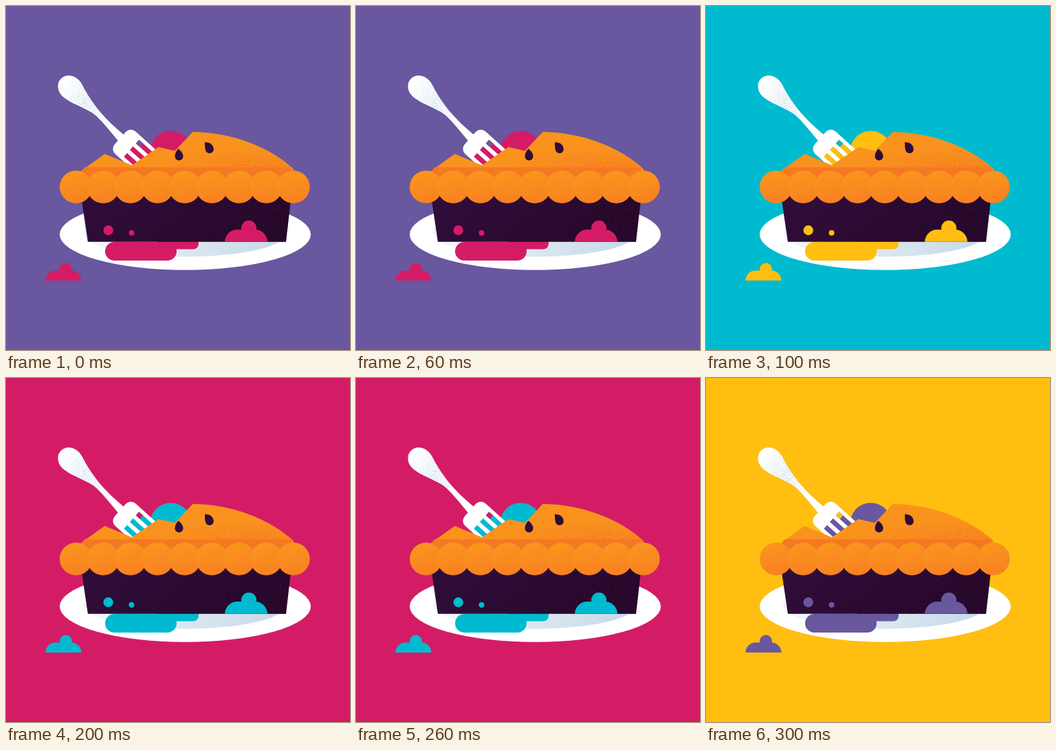
An HTML page that plays this animation: 500x500 px, repeating every 0.4 s.

```html
<!DOCTYPE html>
<html lang="en">
<head>
<meta charset="utf-8">
<title>Pie</title>
<style>
  html, body { margin: 0; width: 100%; height: 100%; overflow: hidden; }
  svg { display: block; width: 100%; height: 100%; background: var(--back); }
  .filling { fill: var(--filling); }
  .back { fill: var(--back); }
  .dark { fill: #2f0d38; }
</style>
</head>
<body>
<svg viewBox="0 0 500 500">
  <defs>
    <linearGradient id="plateShade">
      <stop offset=".05" stop-color="#f1f6fa"/>
      <stop offset=".6" stop-color="#d6e4ee"/>
      <stop offset="1" stop-color="#c6d9e8"/>
    </linearGradient>
    <linearGradient id="crust" x2=".3" y2="1">
      <stop offset=".2" stop-color="#fa941e"/>
      <stop offset="1" stop-color="#f88221"/>
    </linearGradient>
    <linearGradient id="panGrain" x2="1" y2=".3">
      <stop offset=".2" stop-color="#1c0218" stop-opacity="0"/>
      <stop offset="1" stop-color="#1c0218" stop-opacity=".9"/>
    </linearGradient>
    <radialGradient id="lidGrain" cx=".82" cy=".85" r=".5">
      <stop stop-color="#f56a22" stop-opacity=".9"/>
      <stop offset="1" stop-color="#f56a22" stop-opacity="0"/>
    </radialGradient>
    <linearGradient id="forkGrain" x2="1" y2=".6">
      <stop offset=".1" stop-color="#c3d9e8" stop-opacity="0"/>
      <stop offset=".5" stop-color="#c3d9e8" stop-opacity=".8"/>
      <stop offset="1" stop-color="#c3d9e8" stop-opacity="0"/>
    </linearGradient>
    <filter id="grain" x="0" y="0" width="1" height="1" color-interpolation-filters="sRGB">
      <feTurbulence type="fractalNoise" baseFrequency=".8" numOctaves="2" seed="4"/>
      <feColorMatrix values="0 0 0 0 0  0 0 0 0 0  0 0 0 0 0  5 0 0 0 -2.1" result="noise"/>
      <feComposite in="SourceGraphic" in2="noise" operator="in"/>
    </filter>
    <path id="handle" d="M91 101C99 101 106 106 110 113C116 125 124 138 136 153C146 165 158 176 171 187L163 196C152 183 142 170 131 159.5C122 152 110 147.5 97 141C84 134 75.500 128 75.500 116.500A15.500 15.500 0 0 1 91 101Z"/>
    <path id="lidShape" d="M102 247L110 239L143.500 215L183 231.500L221.500 205L245.500 210.500L271.500 183C312 183 372 196 416 235L424 247Z"/>
    <path id="pan" d="M108.500 272H415L407 342.700H119Z"/>
  </defs>

  <ellipse cx="260.5" cy="332" rx="182.5" ry="51.700" fill="#fff"/>
  <ellipse cx="260" cy="330" rx="148" ry="34.5" fill="url(#plateShade)"/>
  <rect class="filling" x="220" y="333" width="60" height="20.5" rx="8"/>
  <rect class="filling" x="144" y="343" width="104" height="27" rx="13.5"/>

  <circle class="filling" cx="239.5" cy="211.500" r="30"/>
  <use href="#handle" fill="#fff"/>
  <use href="#handle" fill="url(#forkGrain)" filter="url(#grain)"/>
  <g transform="translate(166 192) rotate(42)">
    <rect y="-22" width="64" height="44" rx="10" fill="#fff"/>
    <g class="filling">
      <rect x="22" y="-16.5" width="40" height="7"/>
      <rect x="22" y="-3.5" width="40" height="7"/>
      <rect x="22" y="9.5" width="40" height="7"/>
    </g>
    <rect class="back" x="22" y="-16.5" width="8" height="7"/>
  </g>

  <use href="#pan" class="dark"/>
  <use href="#pan" fill="url(#panGrain)" filter="url(#grain)"/>
  <use href="#lidShape" fill="#f9931e"/>
  <use href="#lidShape" fill="url(#lidGrain)" filter="url(#grain)"/>
  <path d="M114 234.500H414L422 256H100Z" fill="#f67822"/>
  <g id="scallops" fill="url(#crust)"></g>
  <g class="dark">
    <path d="M250.500 207.500C254.500 211 257.500 214 257.500 218.500A6 6 0 0 1 245.500 218.500C245.500 214 247.500 211 250.500 207.500Z"/>
    <path d="M289 198C296 198 301 201 301.800 207.500A6 6 0 0 1 290 209.500C289 206 289 202 289 198Z"/>
  </g>

  <g class="filling">
    <circle cx="148.7" cy="326" r="7.2"/>
    <circle cx="182.5" cy="329.8" r="4"/>
    <path d="M318 342.700A18 18 0 0 1 336 325H362A18 18 0 0 1 380 342.700Z"/>
    <circle cx="353" cy="322.8" r="11"/>
    <path d="M57.5 399A14.5 14.5 0 0 1 72 384.5H95A14.5 14.5 0 0 1 109.5 399Z"/>
    <circle cx="87" cy="382.5" r="9"/>
  </g>
</svg>
<script>
  const purple = '#69579f', teal = '#00bad0', pink = '#d41c66', yellow = '#ffbe10';
  const palettes = [[purple, pink], [teal, yellow], [pink, teal], [yellow, purple]];
  const STEP_MS = 100;

  document.getElementById('scallops').innerHTML = Array.from({ length: 9 }, (_, i) =>
    `<circle cx="${101.8 + i * 39.5}" cy="263" r="23.8"/>`).join('');

  const rootStyle = document.documentElement.style;
  let shown = -1;

  function draw(time) {
    const step = Math.floor(time / STEP_MS) % palettes.length;
    if (step !== shown) {
      const [back, filling] = palettes[step];
      rootStyle.setProperty('--back', back);
      rootStyle.setProperty('--filling', filling);
      shown = step;
    }
    requestAnimationFrame(draw);
  }
  draw(0);
</script>
</body>
</html>
```
